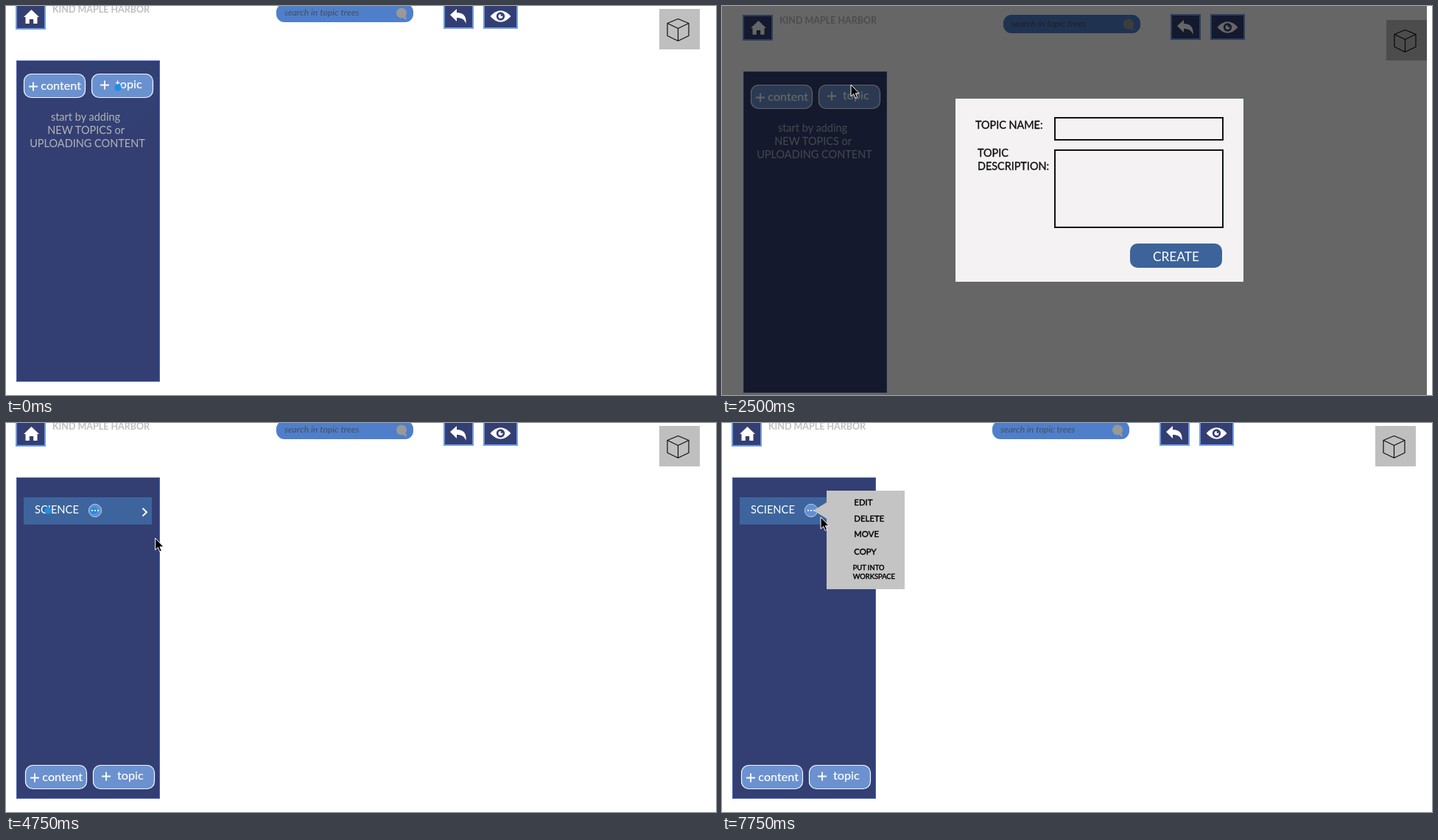
These frames come from a looping animation (964x529 px, 8 s). An HTML page:

```html
<!DOCTYPE html>
<html lang="en">
<head>
<meta charset="utf-8">
<title>Topic tree</title>
<style>
html, body { margin: 0; width: 100%; height: 100%; overflow: hidden; background: #fff; }
svg { display: block; width: 964px; height: 529px; font-family: Lato, sans-serif; }
.btn { fill: #6b91cf; stroke: #f4f7fc; stroke-width: 1.2; }
.plus { stroke: #fff; stroke-width: 1.8; fill: none; }
.word { fill: #fff; font-size: 16.2px; stroke: #fff; stroke-width: .2; }
.tool { fill: #333f73; stroke: #6f9ae4; stroke-width: 2; }
.hint { fill: #b3b3b5; font-size: 14.5px; text-anchor: middle; }
.label { fill: #111; font-size: 14.4px; stroke: #111; stroke-width: .35; }
.field { fill: none; stroke: #111; stroke-width: 2; }
.menu { fill: #000; font-size: 11.4px; stroke: #000; stroke-width: .4; }
.small { font-size: 9.4px; }
.spot { fill: #1f8fe6; }
</style>
</head>
<body>
<svg viewBox="0 0 964 529" xmlns="http://www.w3.org/2000/svg">
  <defs>
    <clipPath id="frame"><rect width="957" height="529"/></clipPath>
    <filter id="soft" x="-10%" y="-30%" width="120%" height="170%">
      <feDropShadow dx="0" dy="1" stdDeviation="1.5" flood-opacity=".22"/>
    </filter>
    <g id="buttons">
      <rect class="btn" x="24.5" y="92.5" width="83" height="32" rx="10"/>
      <path class="plus" d="M31 109.5h12M37 103.5v12"/>
      <text class="word" x="47.3" y="114">content</text>
      <rect class="btn" x="116.5" y="92.5" width="83" height="32" rx="10"/>
      <path class="plus" d="M128 107.5h12M134 101.5v12"/>
      <text class="word" x="149" y="112">topic</text>
    </g>
  </defs>
  <rect width="964" height="529" fill="#fff"/>
  <g clip-path="url(#frame)">
    <g id="page">
      <rect class="tool" x="14" y="-2" width="39" height="33"/>
      <path fill="#fff" d="M34.5 5L45 15h-2.5v9h-5.3v-6h-5.4v6h-5.3v-9H24Z"/>
      <text x="63" y="9" font-size="12.5" font-weight="700" fill="#bfbfbf">KIND MAPLE HARBOR</text>
      <rect x="367" y="-3" width="186" height="25" rx="11" fill="#4f7fcb"/>
      <text x="378" y="13.3" font-size="12.3" font-style="italic" fill="#474d5a">search in topic trees</text>
      <circle cx="537" cy="9.5" r="7" fill="#999"/>
      <path d="M540 13l3 5" stroke="#999" stroke-width="3"/>
      <rect class="tool" x="595" y="-3" width="39" height="33"/>
      <path fill="#fff" d="M603 12l9-8v5c9 0 13.500 5 12.500 15c-2-6-6-8-12.500-8v5Z"/>
      <rect class="tool" x="649" y="-3" width="45" height="33"/>
      <path fill="#fff" d="M657.500 14q14-15.500 28 0q-14 15.500-28 0Z"/>
      <circle cx="671.500" cy="14" r="5.700" fill="#333f73"/>
      <circle cx="671.500" cy="14" r="3" fill="#fff"/>
      <circle cx="673" cy="12.500" r="1.400" fill="#333f73"/>
      <rect x="887" y="4" width="55" height="55" fill="#bfbfbf"/>
      <path d="M912.500 17.500l14.500 6v17l-14.500 7l-14.500-7v-17ZM898 23.500l14.500 7l14.500-7M912.500 30.500v17" fill="none" stroke="#111" stroke-width="1.200" stroke-linejoin="round"/>
      <rect x="14.500" y="74.500" width="194" height="436" fill="#333f73" stroke="#4a5fae"/>
      <g id="empty">
        <use href="#buttons"/>
        <text class="hint" x="108" y="156">start by adding</text>
        <text class="hint" x="108.700" y="174">NEW TOPICS or</text>
        <text class="hint" x="110.500" y="192">UPLOADING CONTENT</text>
      </g>
      <g id="filled">
        <use href="#buttons" x="2" y="373"/>
        <rect x="24" y="101" width="174" height="37" fill="#3e649d"/>
        <text x="39" y="123" font-size="14.700" fill="#fff">SCIENCE</text>
        <path d="M185.500 116l5.500 5.300l-5.500 5.300" fill="none" stroke="#fff" stroke-width="2"/>
        <circle cx="121" cy="119" r="8.700" fill="#648fd3" stroke="#b9c9e6"/>
      </g>
    </g>
    <g id="modal">
      <rect width="957" height="529" fill-opacity=".6"/>
      <rect x="317" y="126" width="391" height="249" fill="#f4f2f3"/>
      <text class="label" x="344" y="167">TOPIC NAME:</text>
      <text class="label" x="347" y="205">TOPIC</text>
      <text class="label" x="347" y="223">DESCRIPTION:</text>
      <rect class="field" x="452" y="152" width="228" height="30"/>
      <rect class="field" x="452" y="196" width="228" height="105"/>
      <rect x="554" y="323" width="125" height="33" rx="10" fill="#3d639b"/>
      <text x="585" y="347" font-size="17.300" fill="#fff">CREATE</text>
    </g>
  </g>
  <circle id="ripple" fill="#1f93ea"/>
  <circle id="spotA" class="spot" r="4.700"/>
  <circle id="spotB" class="spot" cx="119.500" cy="119" r="4.700"/>
  <g id="dots" fill="#fff">
    <circle cx="117" cy="119" r="1.100"/><circle cx="121" cy="119" r="1.100"/><circle cx="125" cy="119" r="1.100"/>
  </g>
  <g id="tip">
    <path d="M95 143.500h19.500l5-5l5 5h280q2 0 2 2v51.500q0 2-2 2h-309.500q-2 0-2-2v-51.500q0-2 2-2Z" fill="#fff" filter="url(#soft)"/>
    <circle cx="122" cy="172" r="16" fill="#c9cdd1"/>
    <text x="122" y="176" font-size="12" letter-spacing=".5" text-anchor="middle" fill="#92979d" font-family="'Open Sans', sans-serif">LB</text>
    <text x="145.500" y="177" font-size="12.100" fill="#3f4560" font-family="'Open Sans', sans-serif">toggle for options for the new topic</text>
  </g>
  <g id="menu">
    <path d="M142 92h106v134h-106v-96l-18-11l18-11Z" fill="#c4c4c4"/>
    <text class="menu" x="179.300" y="112">EDIT</text>
    <text class="menu" x="179.300" y="134">DELETE</text>
    <text class="menu" x="179.300" y="155">MOVE</text>
    <text class="menu" x="179.300" y="179">COPY</text>
    <text class="menu small" x="177.700" y="200">PUT INTO</text>
    <text class="menu small" x="177.700" y="212">WORKSPACE</text>
  </g>
  <path id="cursor" d="M0 0v16l3.700-3.400l2.400 5.700l2.600-1.100l-2.400-5.400h5Z" fill="#000" stroke="#fff" stroke-width="1"/>
</svg>
<script>
const LOOP = 8000, PULSE = 1820, GROW = 1230;
const $ = id => document.getElementById(id);
const show = (id, on) => $(id).setAttribute("visibility", on ? "visible" : "hidden");
const clamp = v => Math.max(0, Math.min(1, v));
const ease = p => p * p * (3 - 2 * p);
const ramp = (t, a, b) => clamp((t - a) / (b - a));

// start, end, from, to
const moves = [
  [700, 1500, [322, 153], [175, 107]],
  [2500, 3250, [175, 107], [582, 345]],
  [4000, 5000, [582, 345], [133, 122]],
  [6000, 6250, [133, 122], [134, 128]]
];

function cursorAt(t) {
  let pos = moves[0][2];
  for (const [a, b, from, to] of moves) {
    if (t < a) break;
    const p = ease(ramp(t, a, b));
    pos = from.map((v, i) => v + (to[i] - v) * p);
  }
  return pos;
}

function drawSpot(t) {
  const first = t < 1500, second = t >= 3500 && t < 6250;
  const [x, y] = first ? [152, 111] : [57, 119];
  const age = (t - (first ? -1180 : 3520) + PULSE) % PULSE;
  const p = clamp(age / GROW);
  for (const id of ["ripple", "spotA"]) {
    $(id).setAttribute("cx", x);
    $(id).setAttribute("cy", y);
  }
  $("ripple").setAttribute("r", 58 * p);
  $("ripple").setAttribute("opacity", 0.75 * Math.pow(1 - p, 1.5));
  const on = first || second && t >= 3750;
  show("spotA", on);
  show("ripple", on && p < 1);
  show("spotB", second && t >= 3750);
}

function draw(t) {
  const modal = t >= 2500 && t < 4000, filled = t >= 4000;
  $("page").setAttribute("transform", modal ? "translate(15 15)" : "");
  show("modal", modal);
  show("empty", !filled);
  show("filled", filled);
  show("dots", filled);
  show("menu", t >= 6250);
  drawSpot(t);
  $("tip").setAttribute("opacity", ramp(t, 4900, 5150) * (1 - ramp(t, 5750, 5950)));
  show("cursor", t >= 700);
  $("cursor").setAttribute("transform", `translate(${cursorAt(t)})`);
}

function tick(now) {
  draw(now % LOOP);
  requestAnimationFrame(tick);
}
draw(0);
requestAnimationFrame(tick);
</script>
</body>
</html>
```
